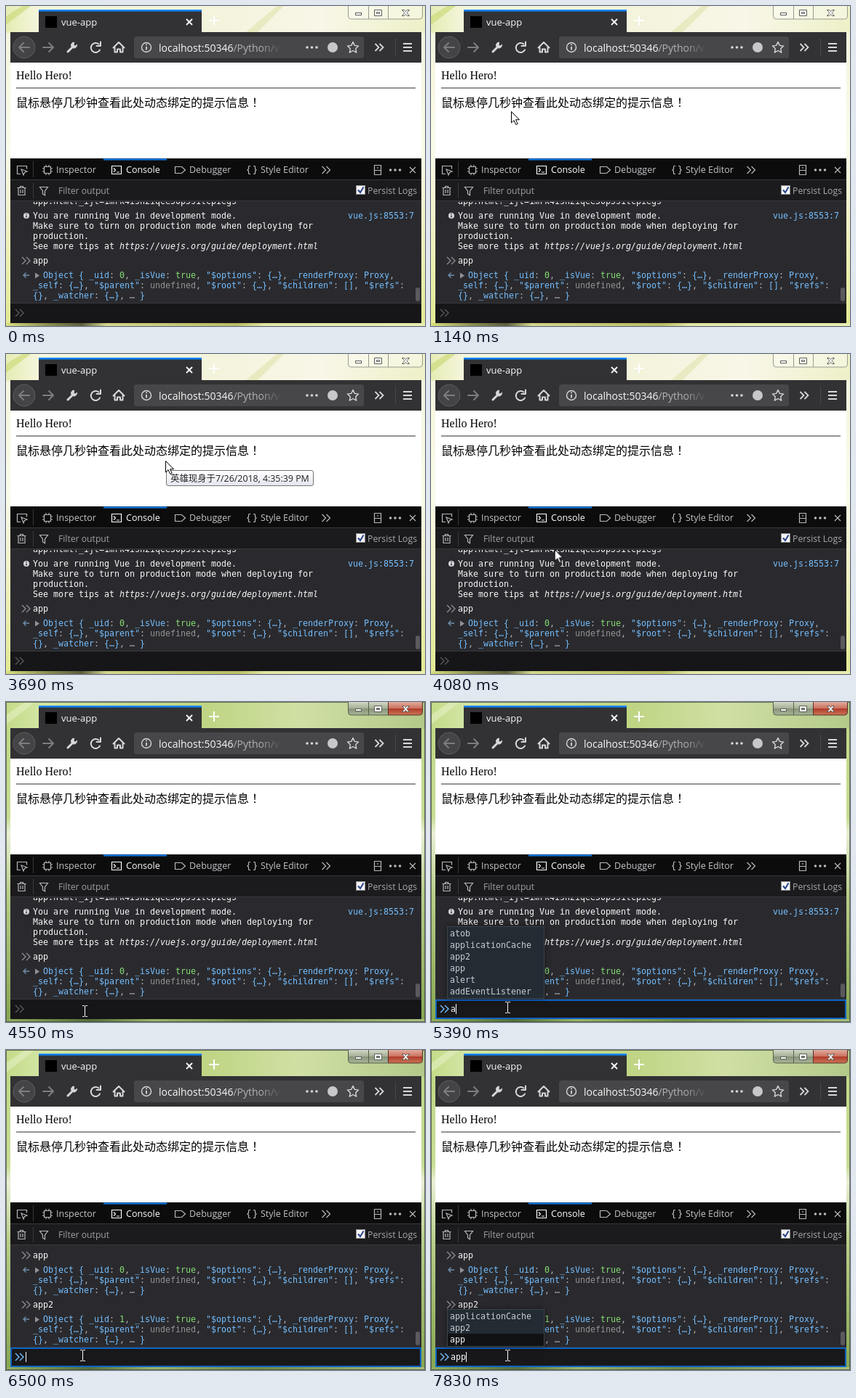
An HTML page for the animation above (8000 ms loop, 576x441 px).

```html
<!DOCTYPE html>
<html lang="zh-CN">
<head>
<meta charset="utf-8">
<title>vue-app</title>
<style>
html, body { margin: 0; width: 100%; height: 100%; overflow: hidden; background: #f3f3da; }
svg { display: block; width: 576px; height: 441px; }
text { white-space: pre; fill: #f9f9fa; font: 12.5px "Open Sans", "Noto Sans CJK SC", sans-serif; }
.mono text, .obj text { font: 11.63px "DejaVu Sans Mono", monospace; }
.line { fill: none; stroke: #d7d7db; stroke-width: 1.4; }
.tab text { fill: #c4c4c8; }
.dim { stroke: #7d7d80; }
.obj text { fill: #75bfff; }
.obj .p { fill: #b1b1b3; }
.obj .u { fill: #939395; }
.obj .n, text.n { fill: #86de74; }
.pop { filter: drop-shadow(0 0 4px rgba(0, 0, 0, .45)); }
.pop text { fill: #c8cdd2; }
.pop rect { fill: #232b33; stroke: #3b434b; }

/* one 8 s loop: 1% is 80 ms */
.k { animation: 8s step-end infinite; }
.hide { opacity: 0; }
#active { animation-name: active; }
#focus { animation-name: focus; }
#tip { animation-name: tip; }
#log { animation-name: scroll; }
#caret { animation-name: caret; }
#arrow { animation-name: arrow; }
#beam { animation-name: beam; stroke: #000; }
#long { animation-name: long; }
#short { animation-name: short; }
#keyA { animation-name: keyA; }
#keyP { animation-name: keyP; }
#key2 { animation-name: key2; }
.ghost { animation-name: ghost; }

@keyframes active { 56.875% { opacity: 1 } }
@keyframes focus { 57.875% { opacity: 1 } }
@keyframes tip { 36.625% { opacity: 1 } 47.125% { opacity: 0 } }
@keyframes scroll {
  0% { transform: translateY(0) }
  80.375% { transform: translateY(-20px) }
  81.25%, 100% { transform: translateY(-68px) }
}
@keyframes keyA { 67.375% { opacity: 1 } 80.375% { opacity: 0 } 93.875% { opacity: 1 } }
@keyframes keyP { 69.375% { opacity: 1 } 80.375% { opacity: 0 } 96% { opacity: 1 } }
@keyframes key2 { 76.375% { opacity: 1 } 80.375% { opacity: 0 } }
@keyframes long { 67.375% { opacity: 1 } 69.375% { opacity: 0 } 93.875% { opacity: 1 } 96% { opacity: 0 } }
@keyframes short { 69.375% { opacity: 1 } 77.25% { opacity: 0 } 96% { opacity: 1 } }
@keyframes ghost {
  0% { fill: #85858a }
  71.375% { fill: #f9f9fa }
  93.875% { fill: #85858a }
  97.875%, 100% { fill: #f9f9fa }
}
@keyframes caret {
  0% { opacity: 0; transform: translateX(0) }
  57.875% { opacity: 1; transform: translateX(0) }
  63.5% { opacity: 0; transform: translateX(0) }
  67.375% { opacity: 1; transform: translateX(7px) }
  69.375% { opacity: 1; transform: translateX(14px) }
  71.375% { opacity: 1; transform: translateX(21px) }
  76.375% { opacity: 1; transform: translateX(28px) }
  80.375% { opacity: 1; transform: translateX(0) }
  84.125% { opacity: 0; transform: translateX(0) }
  89.875% { opacity: 1; transform: translateX(0) }
  93.875% { opacity: 1; transform: translateX(7px) }
  96% { opacity: 1; transform: translateX(14px) }
  97.875%, 100% { opacity: 1; transform: translateX(21px) }
}
@keyframes arrow {
  0% { opacity: 0; transform: translate(464px, 419px) }
  6.625% { opacity: 1; transform: translate(464px, 419px); animation-timing-function: steps(6) }
  12.375% { opacity: 1; transform: translate(115px, 156px) }
  14.25% { opacity: 1; transform: translate(110px, 145px) }
  16.125% { opacity: 0; transform: translate(110px, 145px) }
  26.75% { opacity: 1; transform: translate(219px, 152px) }
  28.875% { opacity: 1; transform: translate(219px, 149px) }
  29.875% { opacity: 0; transform: translate(219px, 147px) }
  46.125% { opacity: 1; transform: translate(219px, 147px); animation-timing-function: steps(9) }
  55% { opacity: 1; transform: translate(108px, 422px) }
  56.875%, 100% { opacity: 0; transform: translate(108px, 422px) }
}
@keyframes beam {
  0% { opacity: 0; transform: translate(110px, 131px) }
  16.125% { opacity: 1; transform: translate(110px, 131px) }
  22.125% { opacity: 1; transform: translate(152px, 126px) }
  22.75% { opacity: 1; transform: translate(194px, 120px) }
  24.875% { opacity: 1; transform: translate(204px, 131px) }
  25.875% { opacity: 1; transform: translate(213px, 139px) }
  26.75% { opacity: 0; transform: translate(219px, 132px) }
  29.875% { opacity: 1; transform: translate(219px, 132px) }
  46.125% { opacity: 0; transform: translate(219px, 132px) }
  56.875% { opacity: 1; stroke: #fff; transform: translate(105px, 418px) }
  59.75%, 100% { opacity: 1; stroke: #fff; transform: translate(102px, 413px) }
}
</style>
</head>
<body>
<svg viewBox="0 0 576 441">
<defs>
  <linearGradient id="pale"><stop stop-color="#e6ecb4"/><stop offset=".08" stop-color="#f5f6dd"/><stop offset=".5" stop-color="#f4f3dc"/><stop offset=".75" stop-color="#f8f7e8"/><stop offset="1" stop-color="#eef0c8"/></linearGradient>
  <linearGradient id="paleSide" x2="0" y2="1"><stop stop-color="#f4f5dc"/><stop offset=".45" stop-color="#fafaea"/><stop offset="1" stop-color="#e3e992"/></linearGradient>
  <linearGradient id="paleFoot"><stop stop-color="#d8de80"/><stop offset=".1" stop-color="#8a8c50"/><stop offset=".18" stop-color="#5c5d3c"/><stop offset=".24" stop-color="#d3d68c"/><stop offset=".55" stop-color="#b9bc62"/><stop offset=".62" stop-color="#e2e6a4"/><stop offset="1" stop-color="#e9ecb0"/></linearGradient>
  <linearGradient id="green"><stop stop-color="#c3dc88"/><stop offset=".08" stop-color="#d2e5a4"/><stop offset=".48" stop-color="#bfd584"/><stop offset=".7" stop-color="#d0e0a4"/><stop offset="1" stop-color="#b3c98a"/></linearGradient>
  <linearGradient id="greenSide" x2="0" y2="1"><stop stop-color="#bfd886"/><stop offset=".36" stop-color="#c8de94"/><stop offset=".41" stop-color="#eaf0d6"/><stop offset=".6" stop-color="#b9cf8a"/><stop offset="1" stop-color="#86a652"/></linearGradient>
  <linearGradient id="greenFoot"><stop stop-color="#93b060"/><stop offset=".2" stop-color="#55703a"/><stop offset=".35" stop-color="#9ab56c"/><stop offset=".6" stop-color="#6f8a48"/><stop offset="1" stop-color="#a9be80"/></linearGradient>
  <linearGradient id="grey" x2="0" y2="1"><stop stop-color="#d2d8c4"/><stop offset=".5" stop-color="#a3ad94"/><stop offset=".52" stop-color="#87937a"/><stop offset="1" stop-color="#a9b596"/></linearGradient>
  <linearGradient id="red" x2="0" y2="1"><stop stop-color="#e2ab9c"/><stop offset=".5" stop-color="#cb6f5d"/><stop offset=".52" stop-color="#b03c2b"/><stop offset="1" stop-color="#cc7658"/></linearGradient>
  <linearGradient id="tipFill" x2="0" y2="1"><stop stop-color="#fff"/><stop offset="1" stop-color="#e4e5f0"/></linearGradient>
  <linearGradient id="urlFade" gradientUnits="userSpaceOnUse" x1="350" x2="378" y1="0" y2="0"><stop stop-color="#b1b1b3"/><stop offset="1" stop-color="#474749"/></linearGradient>
  <clipPath id="logBox"><rect x="6" y="270" width="565" height="139"/></clipPath>
  <clipPath id="urlBox"><rect x="176" y="42" width="200" height="30"/></clipPath>
  <path id="chev" d="M0 0l5 5-5 5M6 0l5 5-5 5"/>
  <path id="cross" d="M-4-4l8 8m0-8l-8 8"/>
  <g id="dots"><circle r="1.8"/><circle cx="6.5" r="1.8"/><circle cx="13" r="1.8"/></g>
  <g id="glyphs" fill="#fff" stroke="#5b5f58">
    <rect x="480.500" y="9.500" width="8" height="3"/>
    <path d="M506.500 5.500h10v8h-10zM509.500 8.500h4v2h-4z" fill-rule="evenodd"/>
    <path d="M544.500 5.500h3l2 2 2-2h3l-3.500 4 3.500 4h-3l-2-2-2 2h-3l3.500-4z"/>
  </g>
  <g id="result" class="obj">
    <path d="M32 371H24m3.500-3.500L24 371l3.500 3.500" class="line" style="stroke:#6f8fae"/>
    <path d="M40 367.500l6 4-6 4z" fill="#939395"/>
    <text x="51" y="375">Object { _uid<tspan class="p">:</tspan>  <tspan class="p">,</tspan> _isVue<tspan class="p">:</tspan> <tspan class="n">true</tspan><tspan class="p">,</tspan> "$options"<tspan class="p">:</tspan> {…}<tspan class="p">,</tspan> _renderProxy<tspan class="p">:</tspan> Proxy<tspan class="p">,</tspan></text>
    <text x="37" y="389">_self<tspan class="p">:</tspan> {…}<tspan class="p">,</tspan> "$parent"<tspan class="p">:</tspan> <tspan class="u">undefined</tspan><tspan class="p">,</tspan> "$root"<tspan class="p">:</tspan> {…}<tspan class="p">,</tspan> "$children"<tspan class="p">:</tspan> []<tspan class="p">,</tspan> "$refs"<tspan class="p">:</tspan></text>
    <text x="37" y="403">{}<tspan class="p">,</tspan> _watcher<tspan class="p">:</tspan> {…}<tspan class="p">,</tspan> <tspan class="p">…</tspan> }</text>
  </g>
</defs>

<!-- window glass, inactive then active -->
<g>
  <rect width="576" height="441" fill="url(#paleSide)"/>
  <rect width="576" height="37" fill="url(#pale)"/>
  <path d="M0 14L22 0H34L0 26z" fill="#cfdc7c" opacity=".7"/>
  <path d="M330 36L372 0h10l-36 36z" fill="#e4e6b4" opacity=".7"/>
  <rect y="437" width="576" height="4" fill="url(#paleFoot)"/>
  <path d="M470.500 0v14q0 4 4 4h94q4 0 4-4V0M498.500 0v18M525.500 0v18" fill="#fff" fill-opacity=".35" stroke="#9a9b8e"/>
  <use href="#glyphs"/>
</g>
<g id="active" class="k hide">
  <rect width="576" height="441" fill="url(#greenSide)"/>
  <rect width="576" height="37" fill="url(#green)"/>
  <path d="M0 18L26 0H40L0 31z" fill="#e4f0c4" opacity=".6"/>
  <rect y="437" width="576" height="4" fill="url(#greenFoot)"/>
  <path d="M.5.5h575v440H.5z" fill="none" stroke="#3c4632" opacity=".7"/>
  <path d="M470.500 0v14q0 4 4 4h51V0" fill="url(#grey)" stroke="#54604a"/>
  <path d="M498.500 0v18" stroke="#54604a"/>
  <path d="M525.500 0v18h43q4 0 4-4V0" fill="url(#red)" stroke="#5a3028"/>
  <use href="#glyphs"/>
</g>
<path d="M279 20h14M286 13v14" stroke="#fff" stroke-width="2"/>

<!-- browser tab and toolbar -->
<path d="M45 5h224v31h302v42H6V36h39z" fill="#323234"/>
<path d="M45 5h224v2.500H45z" fill="#0a84ff"/>
<rect x="54" y="14" width="16" height="16" fill="#000"/>
<text x="76" y="26.500" style="font-size:13px">vue-app</text>
<use href="#cross" x="252" y="22" class="line" style="stroke:#f9f9fa;stroke-width:1.800"/>
<circle cx="25" cy="57" r="15" fill="#444446" stroke="#5d5d60"/>
<g class="line" stroke-linecap="round" stroke-linejoin="round" style="stroke-width:2">
  <path class="dim" d="M32 57H18m6-6l-6 6 6 6M51 57h14m-6-6l6 6-6 6"/>
  <path d="M85 63l7-7" style="stroke-width:3"/>
  <path d="M97.500 53.500a4 4 0 1 1-4-3.500l-.5 4 2 1z" fill="#d7d7db" style="stroke-width:1"/>
  <path d="M129 60.500a6.500 6.500 0 1 1-1.500-8M130 49.500v5.500h-5.500"/>
  <path d="M147.500 57.500l7.500-7.500 7.500 7.500M149.500 57v6.500h3.500v-4h4v4h3.500V57"/>
</g>
<rect x="176" y="42" width="316" height="30" rx="3" fill="#474749"/>
<circle cx="193" cy="57" r="6.500" class="line"/>
<path d="M193 56v4.500M193 52.500v1.800" class="line" style="stroke-width:1.800"/>
<g clip-path="url(#urlBox)"><text x="210" y="62.500" style="font-size:14px">localhost:50346<tspan fill="url(#urlFade)">/Python/v</tspan></text></g>
<use href="#dots" x="414" y="57" fill="#d7d7db"/>
<circle cx="449" cy="57" r="7" fill="#c8c8cb"/>
<path d="M477 49.500l2.300 4.900 5.300.7-3.900 3.700 1 5.300-4.700-2.600-4.700 2.600 1-5.300-3.900-3.700 5.300-.7z" class="line" stroke-linejoin="round"/>
<use href="#chev" x="507.500" y="52" class="line" style="stroke-width:1.800"/>
<path d="M535.500 45v24" stroke="#48484b"/>
<path d="M546 52h12M546 57h12M546 62h12" class="line" style="stroke-width:1.800"/>

<!-- page -->
<rect x="6" y="78" width="565" height="133" fill="#fff"/>
<text x="14" y="101" style="font:16px 'Liberation Serif',serif;fill:#000">Hello Hero!</text>
<path d="M14 113h549" stroke="#707070" stroke-width="1.400"/>
<text x="14" y="139" style="font:16px 'Noto Sans CJK SC',sans-serif;fill:#000">鼠标悬停几秒钟查看此处动态绑定的提示信息<tspan lang="zh-TW" style="font-family:'Noto Sans CJK TC',sans-serif">！</tspan></text>

<!-- developer tools -->
<rect x="6" y="210" width="565" height="227" fill="#2a2a2e"/>
<rect x="6" y="210" width="565" height="30" fill="#0c0c0d"/>
<rect x="6" y="240" width="565" height="29" fill="#1b1b1d"/>
<path d="M6 239.500h565M6 268.500h565M37.500 214v22M37.500 244v21" stroke="#38383d"/>
<rect x="134" y="210.500" width="87" height="2" fill="#0a84ff"/>
<g class="line" style="stroke-width:1.200;stroke:#b8b8bc">
  <path d="M20 231.500h-4.500v-11h13v4M21 225l8 3-3.500 1.500-1.500 3.500z"/>
  <path d="M52.500 221.500h9v9h-9zM50 224h2.500M50 228h2.500M61.500 224H64M61.500 228H64M55 219v2.500M59 219v2.500M55 230.500v2.500M59 230.500v2.500"/>
  <path d="M145.500 220.500h13v11h-13zM148 223.500l2.500 2.500-2.500 2.500M152 229h4" style="stroke:#fff"/>
  <path d="M232.500 221.500h9l5 4.500-5 4.500h-9z"/>
  <path d="M336 220.500h-1.500q-1 0-1 1v3l-1.500 1.500 1.500 1.500v3q0 1 1 1h1.500M340 220.500h1.500q1 0 1 1v3l1.500 1.500-1.500 1.500v3q0 1-1 1H340"/>
  <use href="#chev" x="434.500" y="221"/>
  <path d="M506.500 219.500h9v13h-9zM506.500 226.500h9M511 222v2"/>
  <use href="#cross" x="559" y="226"/>
  <path d="M15.500 250.500h12M19.500 250v-1.500h4v1.500M17 251v9.500h9V251M20 253v5M23 253v5"/>
  <path d="M46.500 249.500h11l-4 5.500v6l-3-2v-4z"/>
</g>
<use href="#dots" x="528.500" y="226" fill="#b8b8bc"/>
<g class="tab">
  <text x="69" y="230">Inspector</text>
  <text x="165" y="230" style="fill:#fff">Console</text>
  <text x="252" y="230">Debugger</text>
  <text x="350" y="230">Style Editor</text>
  <text x="72" y="259" style="font-size:12.200px;fill:#a0a0a4">Filter output</text>
  <text x="497" y="259" style="font-size:12.300px;fill:#a9a9ad">Persist Logs</text>
</g>
<rect x="481.500" y="247.500" width="12" height="12" fill="#f4f4f4" stroke="#8e8f8f"/>
<path d="M484 253.500l3 3.500 4.500-7.500" class="line" style="stroke:#28438c;stroke-width:2"/>

<g class="mono">
  <g clip-path="url(#logBox)">
    <g id="log" class="k">
      <text x="37" y="273">app.html?_ijt=1mrk4ish2iqee50p5s1tcpiegs</text>
      <circle cx="28" cy="289" r="4" fill="#d7d7db"/>
      <path d="M28 288.500v3M28 286v1.300" stroke="#2a2a2e" stroke-width="1.400"/>
      <text x="37" y="293">You are running Vue in development mode.</text>
      <text x="470" y="293" style="fill:#75bfff">vue.js:8553:7</text>
      <text x="37" y="307">Make sure to turn on production mode when deploying for</text>
      <text x="37" y="321">production.</text>
      <text x="37" y="335">See more tips at <tspan font-style="italic">https://vuejs.org/guide/deployment.html</tspan></text>
      <use href="#chev" x="22" y="346" class="line" style="stroke:#8c8c90"/>
      <text x="37" y="355">app</text>
      <use href="#result"/>
      <text class="n" x="156" y="375">0</text>
      <use href="#chev" x="22" y="414" class="line" style="stroke:#8c8c90"/>
      <text x="37" y="423">app2</text>
      <use href="#result" y="68"/>
      <text class="n" x="156" y="443">1</text>
    </g>
  </g>
  <rect x="563" y="388" width="6" height="19" rx="3" fill="#5a5a5e"/>

  <!-- input line -->
  <rect x="6" y="409" width="565" height="28" fill="#161618"/>
  <path d="M6 409.500h565" stroke="#38383d"/>
  <use href="#chev" x="13" y="418" class="line" style="stroke:#58585e"/>
  <g id="focus" class="k hide">
    <rect x="7" y="411" width="563" height="25" fill="#18181a" stroke="#0b62c4" stroke-width="2"/>
    <use href="#chev" x="13" y="418" class="line" style="stroke:#75bfff"/>
  </g>
  <g id="keyA" class="k hide"><text x="27" y="427">a</text></g>
  <g id="keyP" class="k hide"><text x="34" y="427">p<tspan class="k ghost">p</tspan></text></g>
  <g id="key2" class="k hide"><text x="48" y="427">2</text></g>
  <rect id="caret" class="k hide" x="27" y="416" width="1" height="14" fill="#fff"/>

  <!-- completion lists -->
  <g id="long" class="k hide pop">
    <rect x="22.500" y="309.500" width="133" height="99"/>
    <text x="26" y="323">atob</text>
    <text x="26" y="339">applicationCache</text>
    <text x="26" y="355">app2</text>
    <text x="26" y="371">app</text>
    <text x="26" y="387">alert</text>
    <text x="26" y="403">addEventListener</text>
  </g>
  <g id="short" class="k hide pop">
    <rect x="22.500" y="357.500" width="133" height="51"/>
    <rect x="23" y="391" width="132" height="17" style="fill:#111214;stroke:none"/>
    <text x="26" y="371">applicationCache</text>
    <text x="26" y="387">app2</text>
    <text x="26" y="403" style="fill:#f9f9fa">ap<tspan class="k ghost">p</tspan></text>
  </g>
</g>

<g id="tip" class="k hide">
  <rect x="220.500" y="160.500" width="202" height="21" rx="2.500" fill="url(#tipFill)" stroke="#767676"/>
  <text x="226" y="176" style="font-size:12.400px;fill:#222">英雄现身于7/26/2018, 4:35:39 PM</text>
</g>
<path id="arrow" class="k hide" d="M.5.5v15.500l3.600-3.400 2.600 5.900 2.500-1.100-2.600-5.700h4.900z" fill="#fff" stroke="#000"/>
<path id="beam" class="k hide" d="M0 .5h3M4 .5h3M3.500 1v14M0 15.500h3M4 15.500h3" fill="none"/>
</svg>
</body>
</html>
```
